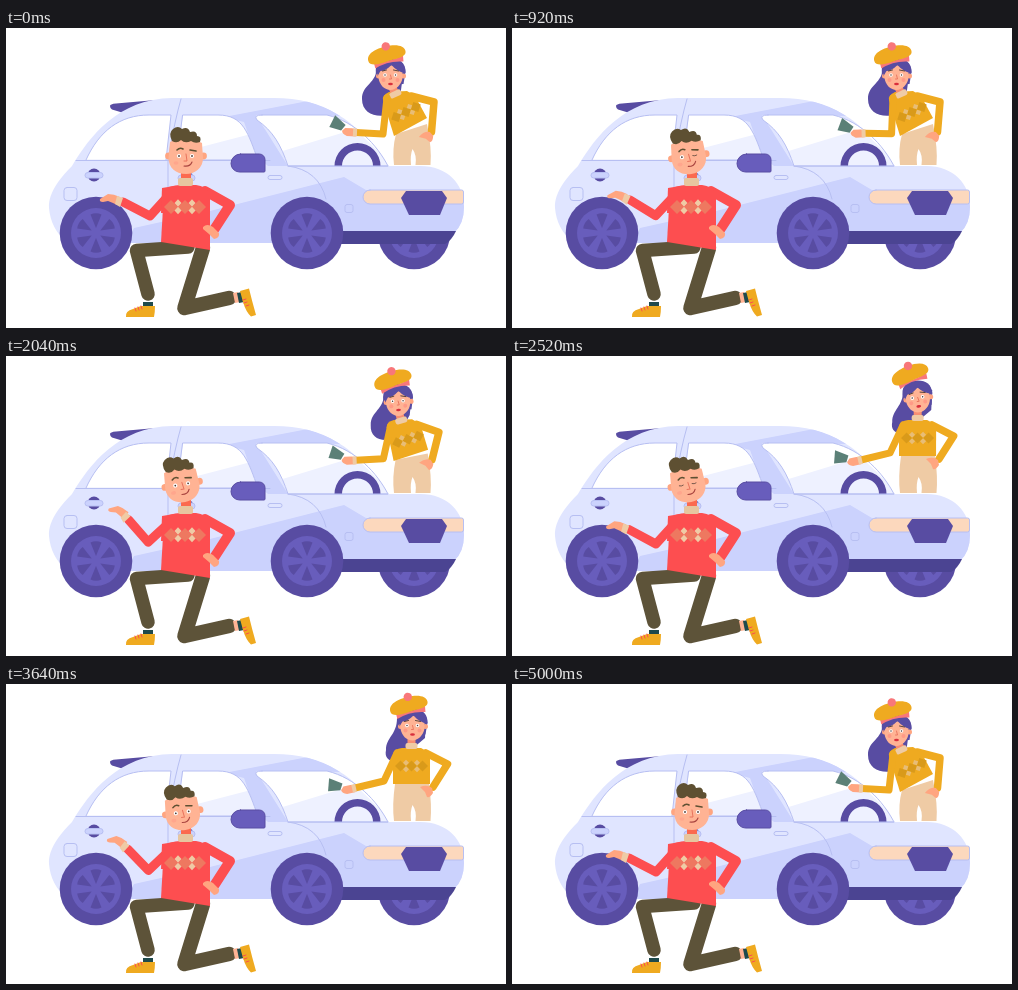
Recreate the animation shown at these times as an HTML page with a canvas. Size 500 by 300 pixels, loop 5040 ms.

```html
<!DOCTYPE html>
<html lang="en">
<head>
<meta charset="utf-8">
<title>Car wash</title>
<style>
html, body { margin: 0; width: 100%; height: 100%; overflow: hidden; background: #fff; }
canvas { display: block; width: 500px; height: 300px; }
</style>
</head>
<body>
<canvas id="stage"></canvas>
<script>
const LOOP = 5040, STEP = 40, WIPE = 5000 / 6;
const canvas = document.getElementById('stage');
const g = canvas.getContext('2d');
const dpr = window.devicePixelRatio || 1;
canvas.width = 500 * dpr;
canvas.height = 300 * dpr;

const C = {
  body: '#e0e5ff', shade: '#cbd2fd', line: '#b7bff2', gloss: '#eef1ff',
  purple: '#584ca2', violet: '#685dbc', bumper: '#4b4492', lamp: '#fcd8bd',
  red: '#fd4e50', pants: '#5d5339', skin: '#ffb394', hand: '#ffa580',
  beige: '#efcba5', yellow: '#efaa20', coral: '#f8777a', sock: '#1f4a4c',
  hair: '#5e5032', ink: '#4a3a33', cloth: '#5b8077'
};

// Drawing helpers
function fill(d, color) { g.fillStyle = color; g.fill(new Path2D(d)); }
function stroke(d, color, width = 1) {
  g.strokeStyle = color; g.lineWidth = width;
  g.lineCap = g.lineJoin = 'round';
  g.stroke(new Path2D(d));
}
function oval(x, y, rx, ry, color) {
  g.fillStyle = color;
  g.beginPath(); g.ellipse(x, y, rx, ry, 0, 0, Math.PI * 2); g.fill();
}
function dot(x, y, r, color) { oval(x, y, r, r, color); }
function box(x, y, w, h, r, color, outline) {
  g.beginPath(); g.roundRect(x, y, w, h, r);
  if (color) { g.fillStyle = color; g.fill(); }
  if (outline) { g.strokeStyle = outline; g.lineWidth = 1; g.stroke(); }
}
function diamond(x, y, rx, ry, color) {
  fill(`M${x - rx} ${y}L${x} ${y - ry}L${x + rx} ${y}L${x} ${y + ry}Z`, color);
}
function limb(points, width, color) { stroke('M' + points.join('L'), color, width); }
function group(x, y, angle, draw) {
  g.save(); g.translate(x, y); g.rotate(angle); draw(); g.restore();
}

// Motion helpers
const mix = (a, b, k) => a + (b - a) * k;
const mixPoint = (a, b, k) => a.map((v, i) => mix(v, b[i], k));
const rad = deg => deg * Math.PI / 180;
const smooth = k => (1 - Math.cos(Math.PI * k)) / 2;
const easeOut = k => Math.sin(k * Math.PI / 2);
const between = (t, a, b) => t >= a && t < b;
function keys(t, list) {
  if (t <= list[0][0]) return list[0][1];
  for (let i = 1; i < list.length; i++) {
    const [t0, a] = list[i - 1], [t1, b] = list[i];
    if (t <= t1) return mix(a, b, smooth((t - t0) / (t1 - t0)));
  }
  return list[list.length - 1][1];
}
function wipe(t) {
  const p = (t / WIPE) % 1, peak = 0.56;
  if (p > peak) return easeOut((1 - p) / (1 - peak));
  return (easeOut(p / peak) + smooth(p / peak)) / 2;
}

function wheel(x) {
  dot(x, 205, 36.3, C.purple);
  dot(x, 205, 25, C.violet);
  for (let i = 0; i < 6; i++) {
    group(x, 205, i * Math.PI / 3, () =>
      fill('M0 -5L-5.5 -18.5Q0 -21 5.5 -18.5Z', C.purple));
  }
}

function car() {
  wheel(408);
  fill('M104 78Q104 76 110 75.5L150 72L116 84.5L106 81.5Q104 80 104 78Z', C.purple);
  const shell = 'M43 180C42 164 56 148 66 138C84 108 112 71 166 70L268 70' +
    'C318 70 350 91 382 138L414 138C442 138 458 156 458 179Q458 196 448 205' +
    'L340 215L62 215C50 206 44 193 43 180Z';
  fill(shell, C.body);
  g.save();
  g.clip(new Path2D(shell));
  fill('M218 89L302 73L340 88L250 87L282 138L262 138L250 128L238 94Z', C.shade);
  fill('M120 215L128 200L200 184L338 149L360 162H470V220H120Z', C.shade);
  g.restore();

  stroke('M175 71Q169 91 162 132V176', C.line);
  stroke('M70 132.5H264', C.line);
  stroke('M282 138Q313 142 320 171', C.line);

  const windows = [
    'M80 132C93 103 114 87 143 87H165L160 132Z',
    'M177 87H212C238 87 242 106 252 132H171Z',
    'M256 87H321C350 94 371 117 382 138H282C275 117 267 103 251 92Q247 87 256 87Z'
  ];
  for (const d of windows) {
    fill(d, '#fff');
    g.save();
    g.clip(new Path2D(d));
    fill('M160 128L245 106L260 134H160Z', C.gloss);
    fill('M270 125L349 101L390 140H270Z', C.gloss);
    g.restore();
    stroke(d, C.line);
  }
  fill('M328.5 138A23 23 0 0 1 374.5 138H367A15.5 15.5 0 0 0 336 138Z', C.purple);
  stroke('M282 138H382', C.line);

  box(58, 159.5, 13, 13, 3, null, C.line);
  dot(88, 147, 6.5, C.purple);
  box(79, 144.5, 18, 5.5, 2.7, C.shade, C.line);
  dot(181, 150, 6.5, C.purple);
  box(172, 147, 17, 6, 3, C.shade, C.line);
  box(262, 147.5, 14, 4, 2, C.body, C.line);
  box(339, 176.5, 8, 8, 2, null, C.line);
  box(225, 126, 34, 18, [10, 6, 1, 9], C.violet, C.purple);

  box(357, 162, 100.5, 14, [7, 2, 2, 7], C.lamp, C.line);
  fill('M400 163H436L441 170L434 187H403L395 170Z', C.purple);
  fill('M334 203H450Q446 212 439 216H334Z', C.bumper);
  wheel(90);
  wheel(301);
}

function eye(x, y, closed, r = 2.1) {
  if (closed) return stroke(`M${x - 2} ${y}Q${x} ${y + 1} ${x + 2} ${y}`, C.ink, 0.7);
  dot(x, y, r, '#fff');
  dot(x, y, r * 0.42, C.ink);
}

function manHead(t) {
  const tilt = keys(t, [[300, 0], [1150, -10], [3450, -10], [4200, 0]]);
  const shut = between(t, 2440, 2600), wink = between(t, 360, 1480);
  group(180, 150, rad(tilt), () => {
    dot(-17.5, -22, 3.4, C.hand);
    dot(17.5, -22, 3.4, C.hand);
    fill('M-16 -36Q0 -44 16 -35L17 -20C17 -10 9 -4 0 -4C-10 -4 -17.5 -10 -17.5 -20Z', C.skin);
    fill('M-14 -37Q-18 -45 -13 -49Q-8 -53 -4 -49Q2 -52 4 -46Q11 -48 11 -42' +
      'Q16 -42 14 -36Q9 -34 5 -37Q-1 -34 -5 -38Q-9 -34 -14 -37Z', C.hair);
    stroke('M-9 -28Q-6 -31 -3 -29M4 -28L10 -27', C.hair, 1.6);
    eye(-7, -22, shut);
    eye(6, -22, shut || wink);
    stroke('M0 -24L1 -17L-2 -17', '#e8735d', 1);
    stroke('M-2 -12Q4 -11 6 -16', '#a94540', 1.1);
    oval(-10, -15, 2.5, 1.8, '#ffa68d');
  });
}

function man(t) {
  const w = wipe(t);
  // Legs and shoes
  limb([[197, 220], [178.5, 280], [223, 270]], 14.5, C.pants);
  fill('M227 265L232 264L234 274L229 275Z', C.skin);
  fill('M231 265L236 264L238 274L233 275Z', C.sock);
  fill('M234 263L243 260.5Q246 273 250 287L245 288.5Q240 284 237 274Z', C.yellow);
  stroke('M237 272L240 271M238 275L241 274M240 278L243 277', C.red, 1);
  limb([[182, 219], [130.5, 222.5], [142, 266]], 13.5, C.pants);
  fill('M137 274H147V280H137Z', C.sock);
  fill('M135 278H149Q149 284 148 289H120Q119 283 127 281Z', C.yellow);
  stroke('M129 280L130 283M132 279L133 282M135 278L136 281', C.red, 1);

  // Sweater
  fill('M175 144H185V157H175Z', '#fb6a4f');
  limb([[199, 163], [224, 177], [208.5, 201]], 10, C.red);
  fill('M158 163Q164 157 174 157H190Q200 158 204 166V222L155 214Z', C.red);
  for (const x of [179, 193]) diamond(x, 179, 7, 7, '#ee7860');
  box(172, 150, 15, 8, 2, '#e7c69f');
  fill('M197 199Q201 195 207 199L213 205Q214 210 208 211L203 206L197 201Z', C.hand);

  // Wiping arm
  const elbow = [mix(144, 142, w), mix(188, 186, w)];
  const wrist = [mix(117, 123, w), mix(174, 163, w)];
  limb([[164, 166], elbow, wrist], 9, C.red);
  fill('M156 160L168 158L168 185H155Z', C.red);
  diamond(165, 179, 7, 7, '#ee7860');
  for (const x of [172, 186]) {
    diamond(x, 175, 3.5, 3.8, C.beige);
    diamond(x, 182.5, 3.5, 3.8, C.beige);
  }
  group(wrist[0], wrist[1], rad(mix(0, 30, w)), () => {
    group(-12, -3, rad(mix(0, -12, w)), () =>
      fill('M6 6L2 4L-3 2L-8 3Q-12 3 -11 0L-3 -5Q3 -5 9 -2Z', C.hand));
    fill('M-6 -6L0 -4L-3 5L-8 2Z', C.beige);
  });
  manHead(t);
}

// The beret lifts off a little while the head sways
function womanHead(x, y, sway, closed) {
  group(x, y, rad(sway), () => {
    fill('M-14 4Q-18 -16 -2 -17Q15 -17 15 -3L13 9L-12 11Z', C.purple);
    dot(-12, 1, 2.5, C.hand);
    dot(13, 1, 2.5, C.hand);
    fill('M-12 -6Q0 -14 12 -5L12 3C11 10 5 15 0 15C-6 15 -11 10 -12 3Z', C.skin);
    fill('M-13 1Q-14 -15 1 -16Q15 -15 15 -2Q7 -3 1 -10Q-5 -4 -10 -4Z', C.purple);
    stroke('M-8 -4L-4 -5M3 -5L8 -4', C.ink, 0.9);
    eye(-5.5, 0, closed, 1.8);
    eye(5, 0, closed, 1.8);
    stroke('M0 0L1 4L-1 4', '#e8735d', 0.9);
    dot(-7, 5, 2, '#ff9a86');
    dot(7, 5, 2, '#ff9a86');
    oval(0, 9, 2.4, 1.3, '#d92f3c');
    group(-4 + sway * 0.15, -19.5 + sway * 0.55, rad(-14), () => {
      fill('M-14 4Q0 7 16 4L15 10Q0 5 -14 10Z', C.coral);
      fill('M-19 1C-19 -7 -8 -9 1 -9C13 -9 19.5 -5 19.5 0C19.5 7 8 5 0 6C-9 7 -19 7 -19 1Z', C.yellow);
      dot(1.5, -9, 4.2, C.coral);
    });
  });
}

function woman(t) {
  const b = keys(t, [[1760, 0], [2440, 1], [2800, 1.09], [3300, 1],
    [4000, 1], [4360, 1.07], [4920, 0]]);
  const sway = keys(t, [[1760, 0], [2400, -7], [2600, -7], [3200, 0]]);
  const w = wipe(t) * keys(t, [[1260, 1], [1400, 0.3], [1760, 0]]);
  const P = (ax, ay, bx, by) => mixPoint([ax, ay], [bx, by], b);
  const at = (...pts) => pts.map(p => P(...p).join(' '));
  const blink = between(t, 160, 280) || between(t, 3720, 3840);

  // Loose hair behind the body
  const h = at([371, 38, 391, 34], [371, 56, 391, 51], [356, 56, 380, 53],
    [356, 71, 380, 66], [356, 85, 378, 75], [369, 90, 385, 79], [382, 87, 392, 76],
    [391, 82, 398, 72], [395, 62, 419, 54], [398, 40, 420, 34]);
  fill(`M${h[0]}C${h[1]} ${h[2]} ${h[3]}C${h[4]} ${h[5]} ${h[6]}Q${h[7]} ${h[8]}L${h[9]}Z`, C.purple);

  // Trousers
  const [q1, q2] = at([390, 106, 389, 100], [421, 96, 423, 100]);
  fill(`M${q1}L${q2}Q426 121 424.5 137H409.5Q411 127 406.5 121Q404 127 405 137H388Q386 121 ${q1}Z`, C.beige);

  // Far arm on the hip
  const shoulder = P(405, 68, 420, 69), bend = P(428, 74, 441.5, 80);
  limb([shoulder, bend, P(425.5, 104, 427, 103)], 7.5, C.yellow);
  const palm = P(421, 109, 421, 107);
  group(palm[0], palm[1], rad(mix(-30, 0, b)), () =>
    fill('M-7 -4Q0 -7 5 -3L6 2Q3 7 0 6L-2 1Z', C.hand));

  // Sweater
  const s = at([377, 72, 387, 70], [383, 64, 396, 64], [401, 63, 415, 64],
    [409, 68, 424, 69], [421, 90, 424, 100], [388, 108, 387, 100]);
  fill(`M${s[0]}Q${at([376, 67, 388, 65])} ${s[1]}L${s[2]}L${s[3]}L${s[4]}L${s[5]}Z`, C.yellow);
  const chest = P(400, 84, 405.5, 82);
  group(chest[0], chest[1], rad(mix(-27, 0, b)), () => {
    for (const x of [-11, 0, 11]) diamond(x, 0, 5.5, 5.5, '#d99a1a');
    for (const x of [-5.5, 5.5]) {
      diamond(x, -3.2, 3, 3, '#e8bd77');
      diamond(x, 3.2, 3, 3, '#e8bd77');
    }
  });
  const neck = P(389, 65, 405.5, 61);
  group(neck[0], neck[1], rad(mix(-25, 0, b)), () => {
    box(-4, -8, 8, 9, 1, '#f88f72');
    box(-6, -2, 12, 6, 2, C.beige);
  });

  // Near arm with the cloth
  const elbow = mixPoint(P(377, 106, 378, 97), [391, 104], w);
  const wrist = mixPoint(P(350, 104.5, 349, 104), [364, 109], w);
  limb([P(381, 70, 391, 69), elbow, wrist], 7, C.yellow);
  group(wrist[0], wrist[1], rad(mix(mix(3, -13, b), -24, w)), () => {
    group(-14, -3, rad(mix(mix(28, 22, b), 24, w)), () =>
      fill('M-13 -8L1 -5L0 2L-12 5Z', C.cloth));
    fill('M0 4L-9 4Q-14 2 -14 -1L-11 -4L-4 -4L0 -3Z', C.hand);
    fill('M-3 -4H1V4H-3Z', C.beige);
  });

  const head = P(384.5, 47, 406.5, 41.5);
  womanHead(head[0] + sway * 0.15, head[1], sway, blink);
}

function draw(now) {
  const t = Math.floor((now % LOOP) / STEP) * STEP;
  g.setTransform(dpr, 0, 0, dpr, 0, 0);
  g.fillStyle = '#fff';
  g.fillRect(0, 0, 500, 300);
  car();
  woman(t);
  man(t);
}

let start;
function tick(now) {
  start ??= now;
  draw(now - start);
  requestAnimationFrame(tick);
}
draw(0);
requestAnimationFrame(tick);
</script>
</body>
</html>
```
